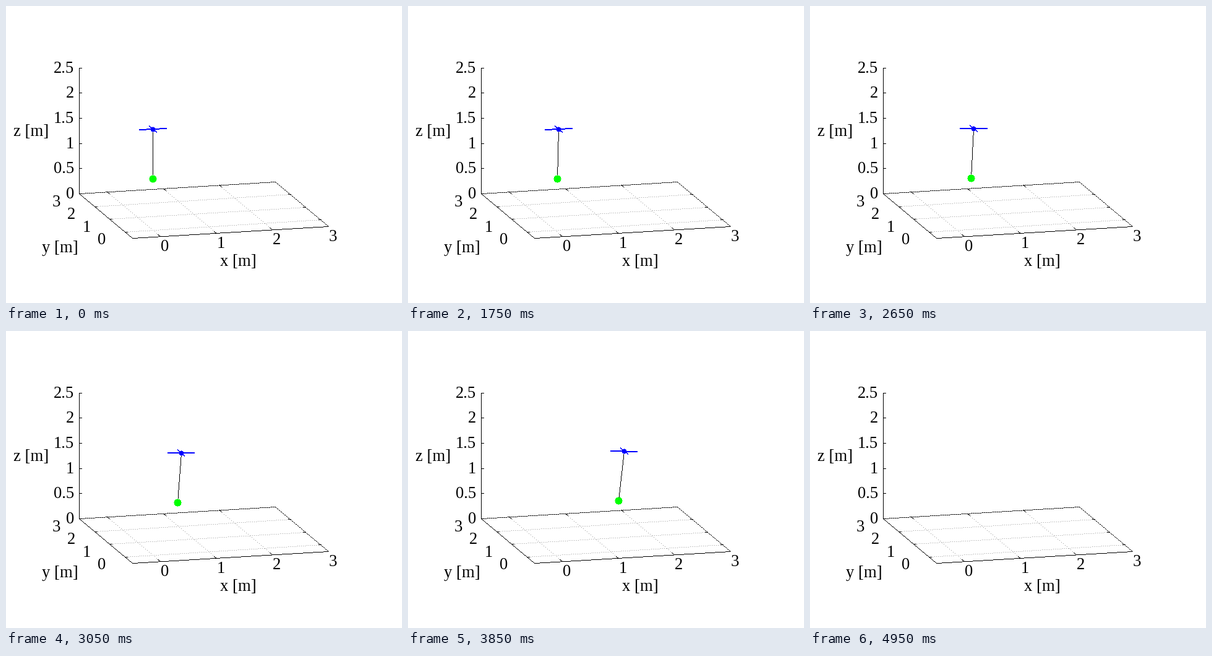
A matplotlib script that plays this animation: 640x480 px, repeating every 7050 ms.

```python
import numpy as np
import matplotlib.pyplot as plt
from matplotlib.animation import FuncAnimation

W, H, DPI = 640, 480, 100
STEP = 50
FRAMES = 141

BLACK, GREY = (0, 0, 0), (160, 160, 160)
BLUE, GREEN = (0, 0, 255), (0, 255, 0)

plt.rcParams["font.family"] = "Liberation Serif"

fig = plt.figure(figsize=(W / DPI, H / DPI), dpi=DPI, facecolor="white")
ax = fig.add_axes([0, 0, 1, 1])
ax.axis("off")

# Oblique projection: metres to pixels
CORNER = np.array([204, 375])
EX = np.array([317, -19.5]) / 3.5
EY = np.array([-86, -72]) / 3.5
EZ = np.array([0, -81.3])
LO, HI = -0.5, 3

ARM = 0.24
EDGE = 509  # the scene is cut off at x = 3 m
START = 237

rows, cols = np.mgrid[:H, :W]


def project(x, y, z=0):
    return CORNER + EX * (x - LO) + EY * (y - LO) + EZ * z


def line(img, p, q, color=BLACK, width=1, every=1, edge=W - 1):
    """Stepped line without smoothing; every > 1 makes it dotted."""
    p, q = np.rint(p), np.rint(q)
    n = int(max(abs(q - p)))
    pts = p + (q - p) * np.linspace(0, 1, n + 1)[:, None]
    x, y = np.rint(pts[::every]).astype(int).T
    x, y = x[x <= edge], y[x <= edge]
    for k in range(width):
        img[y - k, x] = color


def disc(img, c, r, color):
    x, y = np.rint(c)
    img[(cols - x) ** 2 + (rows - y) ** 2 <= r * r] = color


def tick(img, p, direction):
    line(img, p, p + np.array(direction))


def label(x, y, text, ha="center"):
    ax.text(x, y, text, ha=ha, va="baseline", fontsize=26.6 * 72 / DPI)


def draw_box():
    img = np.full((H, W, 3), 255, np.uint8)
    a, b = project(LO, LO), project(HI, LO)
    c, d = project(HI, HI), project(LO, HI)
    for p, q in ((a, b), (b, c), (c, d), (d, a), (d, project(LO, HI, 2.5))):
        line(img, p, q)

    for v in range(4):
        line(img, project(v, LO), project(v, HI), GREY, every=3)
        line(img, project(LO, v), project(HI, v), GREY, every=3)

    for v in range(4):
        front, left = project(v, LO), project(LO, v)
        if v < 3:
            tick(img, front, (-4, -3))
            tick(img, project(v, HI), (4, 3))
            tick(img, left, (4, 0))
            tick(img, project(HI, v), (-4, 0))
        label(front[0] + 6.5, front[1] + 23.5, str(v))
        label(left[0] - 37.5, left[1] + 20, str(v))

    for k in range(6):
        p = project(LO, HI, k / 2)
        tick(img, p, (4, 0))
        label(109.5, p[1] + 7.5, f"{k / 2:g}", "right")

    label(346, 419, "x [m]", "left")
    label(58, 397, "y [m]", "left")
    label(12, 209, "z [m]", "left")
    return img


box = draw_box()
picture = ax.imshow(box, interpolation="nearest", aspect="auto",
                    extent=(-0.5, W - 0.5, H - 0.5, -0.5))


def rise(d):
    return 0.048 * d - 0.00005 * d**2


def update(i):
    t = i * STEP / 1000
    load = 0.445 * t**4 + 0.006 * t**5
    # The load trails by its acceleration over g
    lag = (5.34 * t**2 + 0.12 * t**3) / 9.81
    ride = load + lag

    hub = np.array([START + ride, 199.1 - rise(ride)])
    ball = np.array([START + load, 278.9 - rise(load)])
    along = EX * ARM + np.array([0, 0.25 * lag])
    across = EY * ARM

    img = box.copy()
    line(img, ball, hub, edge=EDGE)
    if ball[0] <= EDGE:
        disc(img, ball, 6, GREEN)
    line(img, hub - along, hub + along, BLUE, 2, edge=EDGE)
    if hub[0] <= EDGE:
        line(img, hub - across, hub + across, BLUE, 2)
        disc(img, hub, 4, BLUE)
    picture.set_data(img)
    return (picture,)


anim = FuncAnimation(fig, update, frames=FRAMES, interval=STEP,
                     repeat=True, repeat_delay=0, blit=False)
plt.show()
```
